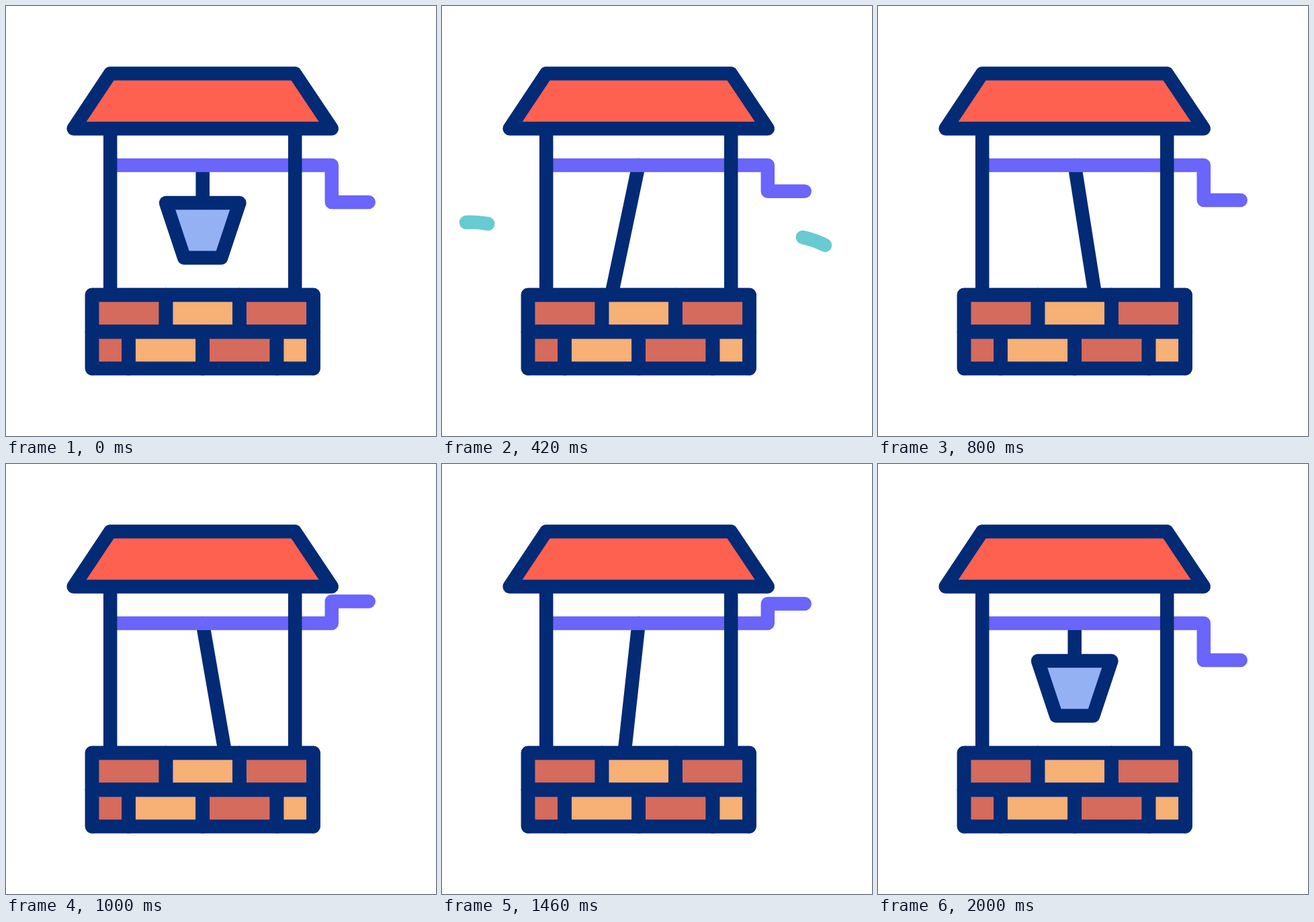
An HTML page with a canvas for the animation above (2.4 s loop, 640 by 640 pixels).

```html
<!DOCTYPE html>
<html lang="en">
<head>
<meta charset="utf-8">
<title>Wishing well</title>
<style>
  html, body { margin: 0; width: 100%; height: 100%; overflow: hidden; background: #fff; }
  canvas { display: block; width: 640px; height: 640px; }
</style>
</head>
<body>
<canvas id="stage" width="640" height="640"></canvas>
<script>
const ctx = document.getElementById('stage').getContext('2d');
const LOOP = 2400, STEP = 20;
const NAVY = '#032a75', RED = '#ff6150', PURPLE = '#6a65fb', TEAL = '#67cbd1';
const BRICK = '#d56b5c', SAND = '#f7b075', PAIL = '#94b1f4';

const linear = s => s;
const smooth = s => s * s * (3 - 2 * s);
const ramp = (t, a, b) => Math.min(1, Math.max(0, (t - a) / (b - a)));

// keys: [time, value] pairs in order
function track(keys, t, ease) {
  for (let i = 1; i < keys.length; i++) {
    const [a, from] = keys[i - 1], [b, to] = keys[i];
    if (t < b) return from + (to - from) * ease(ramp(t, a, b));
  }
  return keys[keys.length - 1][1];
}

const swing = [[0, 0], [450, 12], [900, -12], [1400, 8.7], [1680, -12], [2000, 0]];
const depth = [[0, 56], [220, 230], [1478, 230], [1738, 56]];
const crank = [[0, 55], [180, -40], [385, 55], [590, -40], [794, 55],
               [985, -40], [1172, 55], [1430, -40], [1692, 55]];

function makeArc(d) {
  const el = document.createElementNS('http://www.w3.org/2000/svg', 'path');
  el.setAttribute('d', d);
  return { path: new Path2D(d), length: el.getTotalLength() };
}

const splashes = [
  { head: [160, 412], tail: [215, 460], arcs: [
    makeArc('M212 405C170 368 100 318 36 322'),
    makeArc('M373 406C415 372 490 315 570 356')] },
  { head: [1606, 1940], tail: [1660, 1990], arcs: [
    makeArc('M212 405C140 350 40 330 28 497'),
    makeArc('M374 405C446 350 546 330 558 497')] }
];

function shape(points, color, fill) {
  ctx.beginPath();
  points.forEach(([x, y]) => ctx.lineTo(x, y));
  if (fill) {
    ctx.closePath();
    ctx.fillStyle = fill;
    ctx.fill();
  }
  ctx.strokeStyle = color;
  ctx.stroke();
}

function drawSplash({ head, tail, arcs }, t) {
  const end = ramp(t, ...head), start = ramp(t, ...tail);
  if (end <= start) return;
  ctx.strokeStyle = TEAL;
  for (const { path, length } of arcs) {
    ctx.setLineDash([(end - start) * length, length * 2]);
    ctx.lineDashOffset = -start * length;
    ctx.stroke(path);
  }
  ctx.setLineDash([]);
}

function drawBucket(t) {
  const y = track(depth, t, smooth);
  ctx.save();
  ctx.beginPath();
  ctx.rect(0, 0, 640, 430);
  ctx.clip();
  ctx.translate(292.7, 237);
  ctx.rotate(track(swing, t, smooth) * Math.PI / 180);
  shape([[0, 0], [0, y]], NAVY);
  shape([[-54.7, y], [54.7, y], [27.5, y + 81.7], [-27.5, y + 81.7]], NAVY, PAIL);
  ctx.restore();
}

function drawWall() {
  const rows = [
    { y: 430, cuts: [128, 238, 347.5, 457.5], colors: [BRICK, SAND, BRICK] },
    { y: 485, cuts: [128, 182.5, 292.7, 403, 457.5], colors: [BRICK, SAND, BRICK, SAND] }
  ];
  for (const { y, cuts, colors } of rows) {
    colors.forEach((color, i) => {
      const a = cuts[i], b = cuts[i + 1];
      shape([[a, y], [b, y], [b, y + 54.6], [a, y + 54.6]], NAVY, color);
    });
  }
  // outlines again, so that no fill covers a shared edge
  for (const { y, cuts } of rows) {
    shape([[128, y], [457.5, y]], NAVY);
    cuts.forEach(x => shape([[x, y], [x, y + 54.6]], NAVY));
  }
}

function draw(t) {
  ctx.fillStyle = '#fff';
  ctx.fillRect(0, 0, 640, 640);
  ctx.lineWidth = 20.5;
  ctx.lineCap = ctx.lineJoin = 'round';

  splashes.forEach(s => drawSplash(s, t));
  drawBucket(t);

  const y = 237 + track(crank, t, linear);
  shape([[160, 237], [484.8, 237], [484.8, y], [539.7, y]], PURPLE);

  shape([[155.2, 182.5], [155.2, 430]], NAVY);
  shape([[430.2, 182.5], [430.2, 430]], NAVY);
  shape([[155, 100.6], [430, 100.6], [484.8, 182.4], [100.6, 182.4]], NAVY, RED);
  drawWall();
}

function tick() {
  const t = performance.now() % LOOP;
  draw(Math.floor(t / STEP) * STEP);
  requestAnimationFrame(tick);
}
tick();
</script>
</body>
</html>
```
